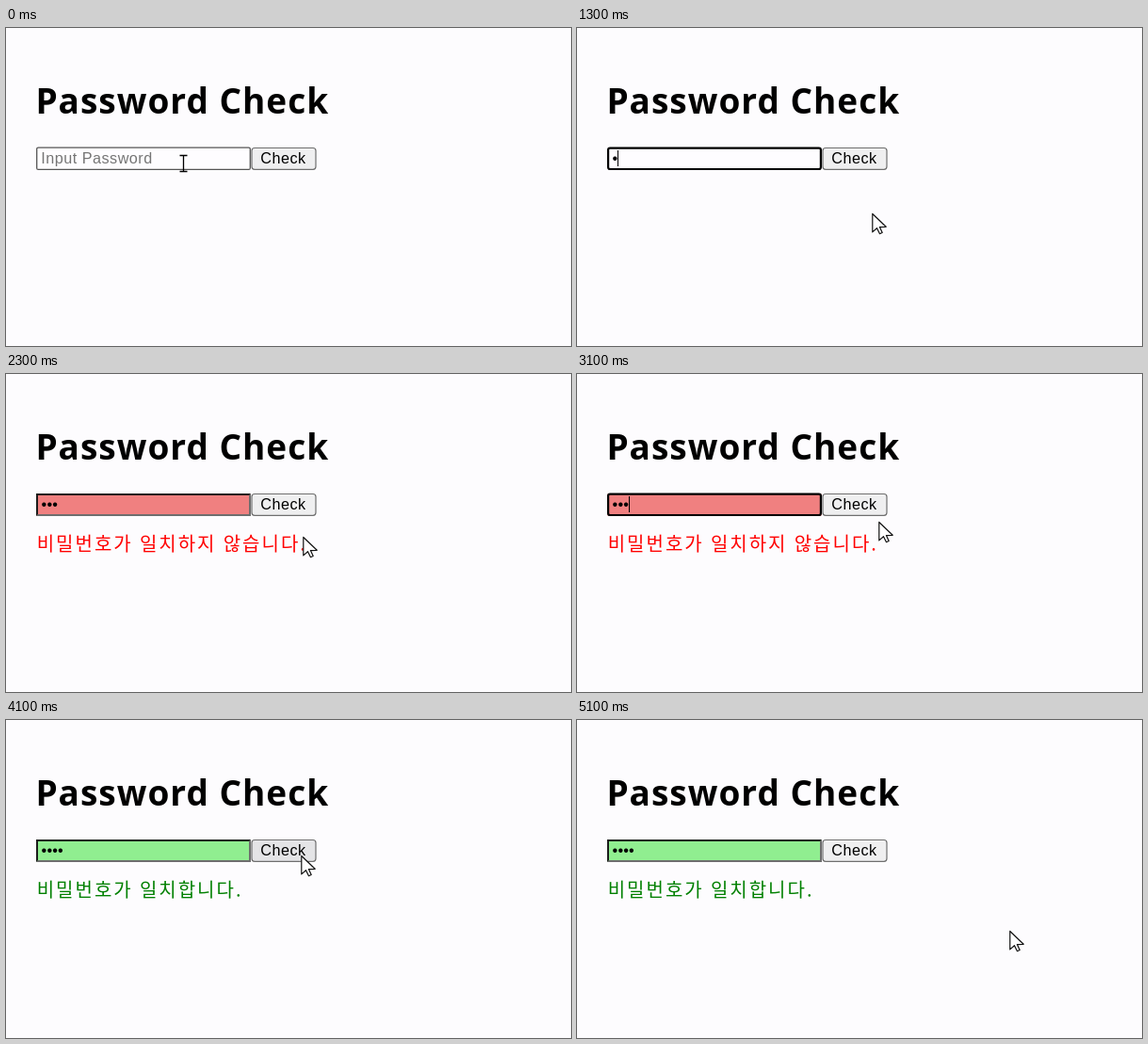
An HTML page for the animation above (5.5 s loop, 600x338 px).

```html
<!DOCTYPE html>
<html lang="ko">
<head>
<meta charset="utf-8">
<title>Password Check</title>
<style>
  html, body { margin: 0; width: 100%; height: 100%; overflow: hidden; background: #fdfcfe; }
  svg { display: block; width: 600px; height: 338px; }
  .title { font: 700 37px "Open Sans", "Noto Sans", sans-serif; letter-spacing: 1px; }
  .ui { font: 16.2px "Liberation Sans", Arial, sans-serif; letter-spacing: .5px; }
  #dots { letter-spacing: .16px; }
  #msg { font: 300 20px "Noto Sans CJK KR", "Noto Sans CJK", sans-serif; letter-spacing: 2px; word-spacing: -.4px; }
</style>
</head>
<body>
<svg viewBox="0 0 600 338">
  <text class="title" x="31.4" y="91">Password Check</text>

  <rect id="field" x="32" y="127" width="228" height="24" rx="2"/>
  <rect id="plain" x="32.7" y="127.1" width="226.6" height="23.3" rx="1.5" fill="none" stroke="#555" stroke-width="1.3"/>
  <g id="inset">
    <path d="M260 127V151H32L34 149H258V129Z" fill="#6e6e6e"/>
    <path d="M32 151V127H260L258 129H34V149Z" fill="#1c1c1c"/>
  </g>
  <rect id="ring" x="33.1" y="127.6" width="225.8" height="22.4" rx="2" fill="none" stroke="#000" stroke-width="2.2"/>

  <text id="hint" class="ui" x="37.2" y="144" fill="#757575">Input Password</text>
  <text id="dots" class="ui" x="37.6" y="144"></text>
  <path id="caret" d="M0 130V147" stroke="#000"/>

  <rect id="button" x="261" y="127.5" width="68" height="22.8" rx="3" stroke="#6f6f6f" stroke-width="1.2"/>
  <text class="ui" x="270.3" y="144">Check</text>

  <text id="msg" x="32.7" y="188.4"></text>

  <path id="arrow" d="M0 0V19.4L4.7 15.2L7.7 21.2L10.4 20L7.6 14.1L14.4 13.8Z" fill="#fff" stroke="#111" stroke-width="1.2" stroke-linejoin="round"/>
  <path id="beam" d="M-4 -9H4M0 -9V8M-4 8H4" fill="none" stroke="#000" stroke-width="1.3"/>
</svg>
<script>
const LOOP = 5500, STEP = 100;
const FOCUS = 200, REJECT = 2100, REFOCUS = 2700, ACCEPT = 3900;
const $ = id => document.getElementById(id);

// pointer stops: time, x, y
const stops = [
  [FOCUS, 188, 144], [800, 221, 192], [1200, 313, 197], [1500, 313, 197], [1800, 312, 157],
  [REJECT, 310, 143], [2400, 316, 178], [2600, 228, 142], [REFOCUS, 228, 142],
  [3100, 320, 157], [3800, 313, 144], [4100, 313, 144], [4200, 378, 160], [5100, 459, 224]
];

const idle = { fill: '#fefdff', text: '' };
const bad = { fill: '#f08080', color: '#f00', text: '비밀번호가 일치하지 않습니다.' };
const good = { fill: '#90ee90', color: '#008000', text: '비밀번호가 일치합니다.' };

const clamp = (v, lo, hi) => Math.min(hi, Math.max(lo, v));
const easeOut = k => 1 - (1 - k) ** 1.7;
const show = (id, on) => $(id).setAttribute('visibility', on ? 'visible' : 'hidden');
const move = (id, x, y = 0) => $(id).setAttribute('transform', `translate(${x} ${y})`);

function pointerAt(t) {
  const next = stops.findIndex(stop => stop[0] > t);
  if (next === 0) return stops[0].slice(1);
  if (next < 0) return stops.at(-1).slice(1);
  const a = stops[next - 1], b = stops[next];
  const k = easeOut((t - a[0]) / (b[0] - a[0]));
  return [1, 2].map(i => Math.round(a[i] + (b[i] - a[i]) * k));
}

// Three characters typed; later erased down to one and retyped to four.
function dotsAt(t) {
  return t < REFOCUS
    ? clamp(Math.floor((t - 1100) / 200), 0, 3)
    : Math.min(4, 1 + Math.abs(t - 2900) / STEP);
}

function draw(t) {
  const [x, y] = pointerAt(t);
  const count = dotsAt(t);
  const result = t < REJECT ? idle : t < ACCEPT ? bad : good;
  const focus = (t >= FOCUS && t < REJECT) || (t >= REFOCUS && t < ACCEPT);
  const blinkOn = Math.floor((t - FOCUS) / 500) % 2 === 0;
  const inRow = y > 126 && y < 151;
  const overField = inRow && x > 32 && x < 260;
  const overButton = inRow && x > 260 && x < 330;

  $('field').setAttribute('fill', result.fill);
  show('plain', !focus && result === idle);
  show('inset', !focus && result !== idle);
  show('ring', focus);
  show('hint', !count);
  show('caret', focus && (count || blinkOn));
  move('caret', Math.floor(38 + count * 5.83) + .5);
  $('dots').textContent = '•'.repeat(count);
  $('button').setAttribute('fill', overButton ? '#e4e4e6' : '#efeff0');
  $('msg').textContent = result.text;
  $('msg').setAttribute('fill', result.color || 'none');

  show('arrow', !overField);
  show('beam', overField);
  move('arrow', x + .8, y + .5);
  move('beam', x + .5, y + .5);
}

const start = performance.now();
function tick(now) {
  const t = Math.max(0, now - start) % LOOP;
  draw(Math.floor(t / STEP) * STEP);
  requestAnimationFrame(tick);
}
draw(0);
requestAnimationFrame(tick);
</script>
</body>
</html>
```
